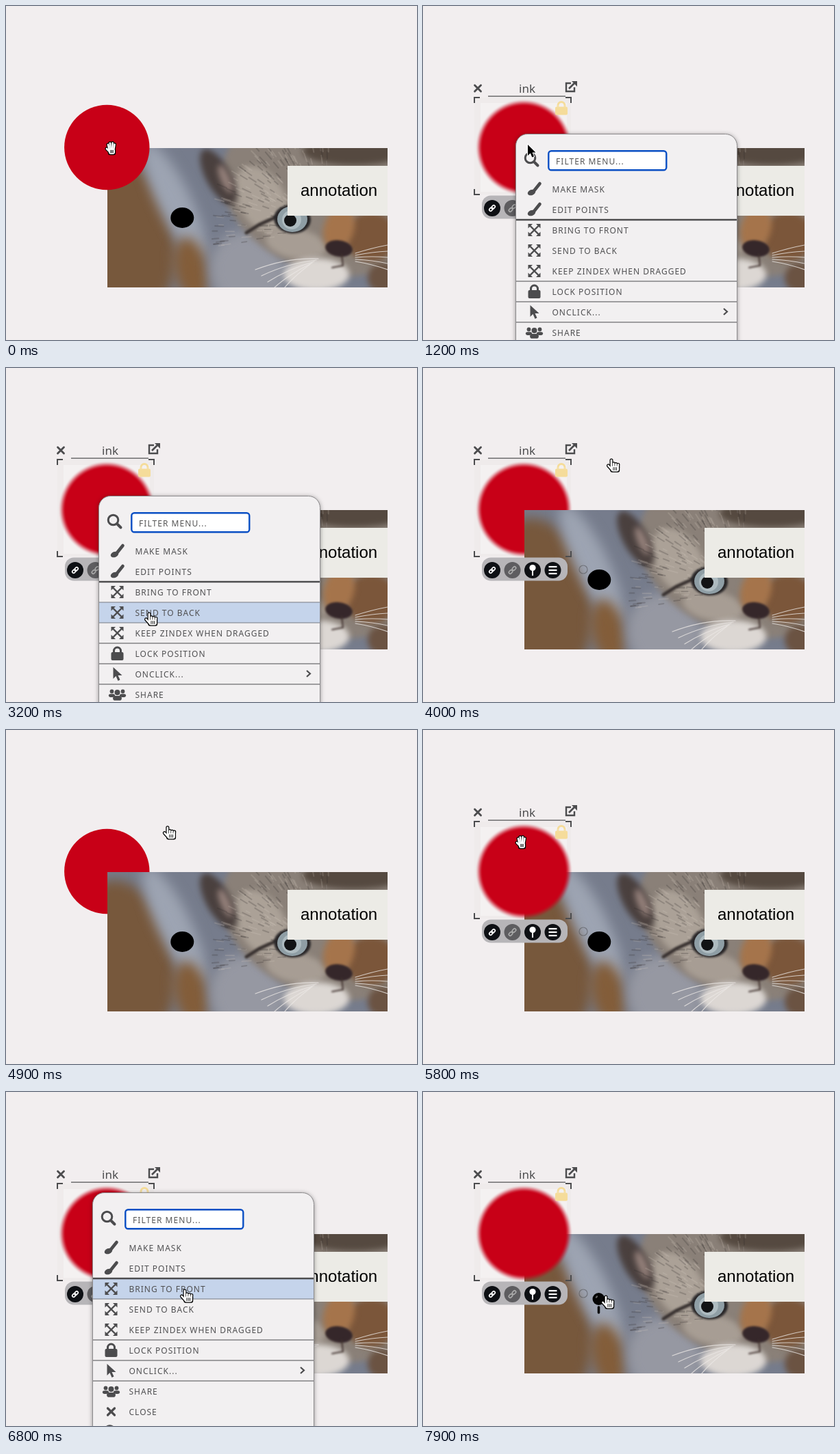
These frames come from a looping animation (600x489 px, 8 s). An HTML page with a canvas:

```html
<!DOCTYPE html>
<html lang="en">
<head>
<meta charset="utf-8">
<title>Ink menu</title>
<style>
html, body { margin: 0; width: 100%; height: 100%; overflow: hidden; background: #f2eeef; }
canvas { display: block; width: 600px; height: 489px; }
</style>
</head>
<body>
<canvas id="stage" width="600" height="489"></canvas>
<script>
const LOOP = 8000, RED = '#c80017', DARK = '#4c4c4e';
const SANS = '"Noto Sans", sans-serif';
const INK = { x: 147.3, y: 207, r: 62.2 };
const main = document.getElementById('stage').getContext('2d');
let c = main;

// Cursor moves: start, end, x, y
const HOME = [153, 203];
const MOVES = [
  [1600, 2200, 212, 325], [2650, 3150, 209, 358], [3550, 4000, 275, 133],
  [4450, 5700, 143, 159], [6300, 6750, 261, 289], [7200, 7600, 267, 298]
];
const MENUS = [
  { from: 700, to: 3500, x: 135, y: 187 },
  { from: 6300, to: 7200, x: 126, y: 147 }
];
const ROW = 30, FIRST_ROW = 81, MENU_W = 323;
const ROWS = [
  { label: 'MAKE MASK', icon: brush },
  { label: 'EDIT POINTS', icon: brush },
  { label: 'BRING TO FRONT', icon: expand, rule: 2.4 },
  { label: 'SEND TO BACK', icon: expand },
  { label: 'KEEP ZINDEX WHEN DRAGGED', icon: expand },
  { label: 'LOCK POSITION', icon: padlock, rule: 1.2 },
  { label: 'ONCLICK...', icon: arrowIcon, rule: 1.2, more: true },
  { label: 'SHARE', icon: people, rule: 1.2 },
  { label: 'CLOSE', icon: cross },
  { label: '', icon: lens }
];

const ramp = (t, a, b) => Math.max(0, Math.min(1, (t - a) / (b - a)));
const ease = v => v * v * (3 - 2 * v);

function cursorAt(t) {
  let [x, y] = HOME;
  for (const [a, b, tx, ty] of MOVES) {
    const k = ease(ramp(t, a, b));
    x += (tx - x) * k;
    y += (ty - y) * k;
  }
  return [x, y];
}

function seeded(seed) {
  return () => (seed = seed * 16807 % 2147483647) / 2147483647;
}
function at(x, y, draw) {
  c.save();
  c.translate(x, y);
  draw();
  c.restore();
}
function fill(color, path) {
  c.fillStyle = color;
  path ? c.fill(path) : c.fill();
}
function line(color, width, ...pts) {
  c.strokeStyle = color;
  c.lineWidth = width;
  c.beginPath();
  for (let i = 0; i < pts.length; i += 2) c.lineTo(pts[i], pts[i + 1]);
  c.stroke();
}
function disc(x, y, rx, color, ry = rx, turn = 0) {
  c.beginPath();
  c.ellipse(x, y, rx, ry, turn, 0, 7);
  fill(color);
}
function ring(x, y, r, color, width) {
  c.beginPath();
  c.arc(x, y, r, 0, 7);
  c.strokeStyle = color;
  c.lineWidth = width;
  c.stroke();
}
function box(x, y, w, h, r, color) {
  c.beginPath();
  c.roundRect(x, y, w, h, r);
  fill(color);
}
function text(s, x, y, font, color, spacing = 0) {
  c.font = font;
  c.fillStyle = color;
  c.letterSpacing = spacing + 'px';
  c.fillText(s, x, y);
}

// Icons, each around 0,0
function brush() {
  c.lineCap = 'round';
  line(DARK, 4.6, 8, -8, 0, 2);
  disc(-4, 5, 6, DARK, 4, -.4);
}
function expand() {
  for (let i = 0; i < 4; i++) {
    line(DARK, 2.4, 0, 0, 6, 6);
    c.beginPath();
    c.moveTo(9, 9);
    c.lineTo(2.5, 9);
    c.lineTo(9, 2.5);
    fill(DARK);
    c.rotate(Math.PI / 2);
  }
}
function padlock(color = DARK) {
  c.strokeStyle = color;
  c.lineWidth = 3;
  c.beginPath();
  c.arc(0, -4, 5, Math.PI, 0);
  c.stroke();
  for (const x of [-5, 5]) line(color, 3, x, -4, x, -2);
  box(-9, -2, 18, 12, 2, color);
}
function arrowIcon() {
  fill(DARK, new Path2D('M-6-10V7L-2 3L1 10L4 8.5L1 2H7Z'));
}
function person(x, y, r, color) {
  disc(x, y, r, color);
  box(x - r * 1.6, y + r * 1.25, r * 3.2, r * 1.7, r, color);
}
function people() {
  person(-8, -4.5, 2.9, DARK);
  person(8, -4.5, 2.9, DARK);
  person(0, -3, 4.8, '#f2f0f1');
  person(0, -3, 4, DARK);
}
function cross() {
  c.lineCap = 'round';
  line(DARK, 3.2, -5, -5, 5, 5);
  line(DARK, 3.2, -5, 5, 5, -5);
}
function lens() {
  ring(-2, -2, 7.3, DARK, 3);
  c.lineCap = 'round';
  line(DARK, 4, 4.5, 4.5, 9, 9);
}
function chain(color, gap) {
  c.rotate(-Math.PI / 4);
  c.strokeStyle = color;
  c.lineWidth = 1.6;
  for (const side of [-1, 1]) {
    c.beginPath();
    c.roundRect(side * (2.2 + gap) - 3, -2, 6, 4, 2);
    c.stroke();
  }
}

// Photo stand-in: soft tones, fur strokes, eye, nose and whiskers
function soft(blur, spots) {
  c.filter = `blur(${blur}px)`;
  for (const [color, x, y, rx, ry, turn = 0] of spots) disc(x, y, rx, color, ry, turn);
  c.filter = 'none';
}
function makePhoto() {
  const cv = document.createElement('canvas'), rnd = seeded(7);
  cv.width = 409;
  cv.height = 204;
  c = cv.getContext('2d');
  c.fillStyle = '#767c8c';
  c.fillRect(0, 0, 409, 204);
  soft(9, [
    ['#77583c', 25, 130, 72, 120, -.2],
    ['#9da4b2', 98, 78, 24, 95, -.45],
    ['#835d39', 122, 178, 24, 48, -.2],
    ['#9698a2', 205, 180, 55, 60, -.4]
  ]);
  soft(4, [
    ['#8a8078', 315, 70, 155, 110, .4],
    ['#aba197', 225, 75, 34, 52, -.5],
    ['#a79d94', 275, 140, 45, 22, .2],
    ['#554940', 360, 5, 75, 20],
    ['#7b563a', 385, 130, 38, 36],
    ['#a5744b', 338, 118, 22, 32, .3],
    ['#dcd7d3', 305, 185, 48, 24],
    ['#6b5342', 402, 190, 22, 22],
    ['#4a403e', 162, 42, 18, 45, -.5],
    ['#94807a', 172, 45, 7, 22, -.4]
  ]);
  c.lineCap = 'round';
  for (let i = 0; i < 260; i++) {
    const a = 3 + rnd() * 1.7, d = 55 + rnd() * 110;
    const x = 325 + Math.cos(a) * d, y = 120 + Math.sin(a) * d, n = 5 + rnd() * 9;
    line(i % 2 ? '#2e282738' : '#d8cfc530', 2, x, y, x + Math.cos(a) * n, y + Math.sin(a) * n);
  }
  c.filter = 'blur(1.5px)';
  line('#37302f', 5, 203, 124, 222, 112, 246, 101);
  disc(338, 147, 20, '#35272a', 12, .15);
  line('#3f302d', 2, 342, 155, 344, 172, 328, 175);
  disc(270, 104, 27, '#292729', 21, .1);
  c.filter = 'none';
  disc(270, 104, 22, '#8f9ea5', 19);
  disc(269, 105, 14, '#aebbc0');
  disc(267, 106, 9, '#121315');
  c.strokeStyle = '#ece8e5cc';
  c.lineWidth = 1.2;
  for (let i = 0; i < 5; i++) {
    c.beginPath();
    c.moveTo(308 - i * 3, 162 + i * 2);
    c.quadraticCurveTo(262, 160 + i * 9, 216 + i * 9, 178 + i * 9);
    c.moveTo(362, 154 + i * 3);
    c.quadraticCurveTo(387, 146 + i * 6, 409, 142 + i * 9);
    c.stroke();
  }
  c = main;
  return cv;
}
const photo = makePhoto();

function drawPhoto(pinned) {
  c.drawImage(photo, 148, 208);
  c.fillStyle = '#ecebe6';
  c.fillRect(411, 234, 146, 73);
  text('annotation', 430, 277.5, '24px "Liberation Sans", Arial, sans-serif', '#000');
  if (pinned) {
    at(256.5, 303, () => {
      c.lineCap = 'round';
      line('#0a0a0a', 3.6, 0, 12, 0, 20);
      disc(0, 0, 9, '#050505');
      disc(-3, -3, 2, '#666', 1.2, -.8);
    });
  } else {
    disc(257.3, 310, 17, '#000', 15);
  }
}

function drawInk(sel) {
  const { x, y, r } = INK;
  c.globalAlpha = 1 - sel * sel;
  disc(x, y, r, RED);
  c.globalAlpha = sel;
  const glow = c.createRadialGradient(x, y, r - 2, x, y, r + 9);
  for (let i = 0; i <= 8; i++) {
    const a = Math.round(255 * (1 - ease(i / 8)));
    glow.addColorStop(i / 8, RED + a.toString(16).padStart(2, '0'));
  }
  disc(x, y, r + 9, glow);
  c.globalAlpha = 1;
}

function drawTools() {
  const tools = [
    () => chain('#fff', 0),
    () => chain('#aaa', 1.3),
    () => {
      line('#fff', 2, 0, 0, 0, 8);
      disc(0, -3.5, 4.6, '#fff');
    },
    () => {
      for (const y of [-5, 0, 5]) line('#fff', 2.2, -6, y, 6, y);
    }
  ];
  box(86, 277.5, 125, 34, 13, '#b7b5b8');
  tools.forEach((draw, i) => at(101 + i * 29.5, 296, () => {
    disc(0, 0, 12, i === 1 ? '#5e5d60' : '#0e1014');
    draw();
  }));
}

function drawFrame(sel) {
  if (!sel) return;
  c.save();
  c.globalAlpha = sel;
  at(80, 120.5, () => { c.scale(.9, .9); cross(); });
  text('ink', 140, 127, '17px ' + SANS, DARK);
  line('#505052', 1.2, 95, 132.2, 208, 132.2);
  at(216, 118, () => {
    line(DARK, 2.4, 0, -5, -7, -5, -7, 7, 5, 7, 5, 1);
    line(DARK, 2.6, -3, 3, 6, -6);
    fill(DARK, new Path2D('M1-8H9V0Z'));
  });
  for (const x of [75, 216]) for (const y of [134, 276])
    line(DARK, 2, x + 8 * Math.sign(145 - x), y, x, y, x, y + 8 * Math.sign(205 - y));
  at(202, 149.5, () => padlock('#f5dc9a'));
  drawTools();
  ring(234, 295, 6, '#55555999', 1.2);
  c.restore();
}

function drawMenu(m, t, my) {
  at(m.x, m.y, () => {
    c.shadowColor = '#0007';
    c.shadowBlur = 6;
    c.shadowOffsetY = 1;
    box(.5, .5, MENU_W, 430, 17, '#f2f0f1');
    c.shadowColor = 'transparent';
    c.strokeStyle = '#8d8b8d';
    c.lineWidth = 1;
    c.stroke();

    at(23.5, 37.5, lens);
    box(48.3, 25.3, 172, 28, 4, '#fff');
    c.strokeStyle = '#0a4fc4';
    c.lineWidth = 2.4;
    c.stroke();
    text('FILTER MENU...', 59, 44.5, '12px ' + SANS, '#555', 1.05);
    if ((t - m.from) % 1000 < 500) box(60, 31, 1, 17, 0, '#222');

    const hover = Math.round((my - m.y - FIRST_ROW) / ROW);
    ROWS.forEach(({ label, icon, rule, more }, i) => at(0, FIRST_ROW + i * ROW, () => {
      if (i === hover) {
        box(1, -15, MENU_W - 1, ROW, 0, '#c5d4eb');
        for (const y of [-15, 15]) line('#777b83', 1, 1, y, MENU_W, y);
      }
      if (rule) line(DARK, rule, 1, -15, MENU_W, -15);
      if (more) line(DARK, 2.2, 304, -5, 309, -.5, 304, 4);
      text(label, 53.5, 4.5, '12px ' + SANS, '#505052', 1);
      at(27.5, 0, () => icon());
    }));
  });
}

// Fingers from a palm: a dark pass, then a slimmer white one
function hand(fingers, px, py, w, h) {
  c.lineCap = 'round';
  for (const [color, grow] of [['#000', 1.2], ['#fff', 0]]) {
    for (const f of fingers) line(color, 2.6 + grow * 2, ...f);
    box(px - grow, py - grow, w + grow * 2, h + grow * 2, 3, color);
  }
  for (let i = 1; i < 4; i++) {
    const x = px + w * (i + .5) / 5;
    line('#000', .9, x, py + 2, x, py + 6);
  }
}
const CURSORS = {
  finger() {
    const fingers = [[0, 2, 0, 13], [-4.5, 10, 0, 15]];
    for (let i = 1; i < 4; i++) fingers.push([i * 3.3, 6 + i * .8, i * 3.2, 13]);
    hand(fingers, -.5, 10.5, 11.5, 8);
  },
  palm() {
    const fingers = [[-6, 6, -1, 11]];
    for (let i = 0; i < 4; i++) {
      const a = -.55 + i * .35, n = 11 - Math.abs(i - 1.5);
      fingers.push([1 + Math.sin(a) * n, 8 - Math.cos(a) * n, i * 2 - 2, 9]);
    }
    hand(fingers, -3, 6, 9, 8);
  },
  arrow() {
    const shape = new Path2D('M0 0V16L3.8 12.5L6.3 18.5L9 17.3L6.5 11.6H11.5Z');
    c.strokeStyle = '#fff';
    c.lineWidth = 2;
    c.stroke(shape);
    fill('#000', shape);
  }
};

function render(t) {
  const [x, y] = cursorAt(t);
  const menu = MENUS.find(m => t >= m.from && t < m.to);
  const sel = ramp(t, 50, 350) - ramp(t, 4150, 4400) + ramp(t, 5350, 5600);
  const front = t < 3500 || t >= 5400;
  const onPin = !menu && Math.hypot((x - 257) / 17, (y - 310) / 15.5) < 1;
  const onInk = front && Math.hypot(x - INK.x, y - INK.y) < INK.r;

  box(0, 0, 600, 489, 0, '#f2eeef');
  c.globalAlpha = sel;
  box(75, 134, 141, 142, 0, '#efebeb');
  box(84, 142, 126, 130, 0, '#f4f1f1');
  c.globalAlpha = 1;
  const layers = [() => drawInk(sel), () => drawPhoto(onPin)];
  if (front) layers.reverse();
  layers.forEach(draw => draw());
  drawFrame(sel);
  if (menu) drawMenu(menu, t, y);

  const kind = menu ? (y < menu.y + 66 ? 'arrow' : 'finger') : onInk ? 'palm' : 'finger';
  at(x, y, CURSORS[kind]);
}

const start = performance.now();
function tick() {
  render((performance.now() - start) % LOOP);
  requestAnimationFrame(tick);
}
render(0);
requestAnimationFrame(tick);
</script>
</body>
</html>
```
